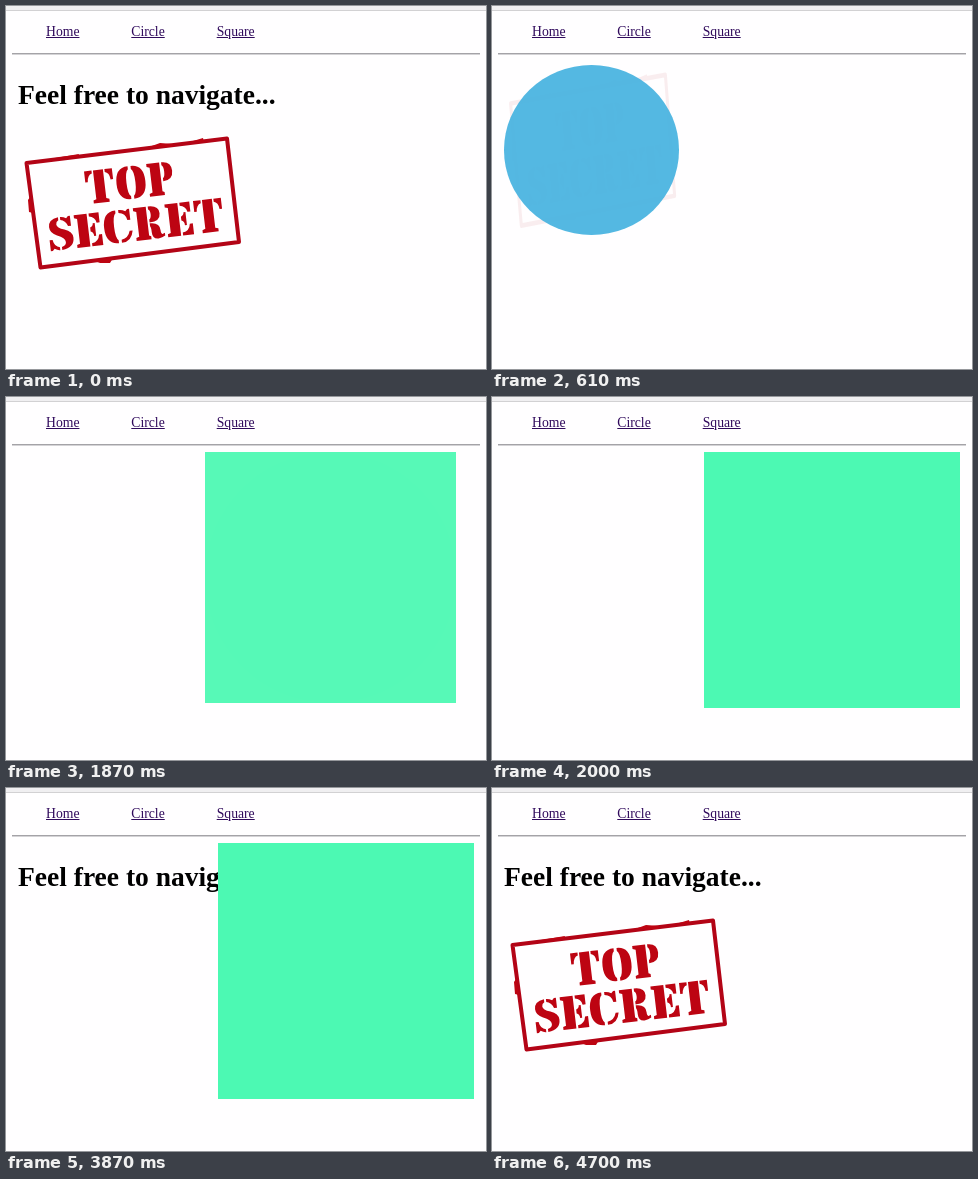
Animation of 480x363 px, one loop 4750 ms. Source, as an HTML page:

```html
<!DOCTYPE html>
<html lang="en">
<head>
<meta charset="utf-8">
<title>Shared element transitions</title>
<style>
  html, body { margin: 0; width: 100%; height: 100%; overflow: hidden; background: #fffeff; }
  body { position: relative; font-family: "Liberation Serif", Times, serif; }
  body > * { position: absolute; white-space: nowrap; }
  #chrome { left: 0; top: 0; width: 480px; height: 4px; background: #f0eff1; border-bottom: 1px solid #d2d1d3; }
  nav { left: 40px; top: 17px; font-size: 13.7px; line-height: 17px; }
  nav span { position: absolute; color: #300a5c; text-decoration: underline; }
  #rule { left: 6px; top: 47px; width: 468px; height: 1px; background: #a4a3a7; border-bottom: 1px solid #d4d3d6; }
  h1 { left: 12px; top: 73px; margin: 0; font-size: 27.5px; line-height: 32px; color: #000; }
  #morph > * { position: absolute; width: 100%; height: 100%; }
  #circle { background: #49b4e0; border-radius: 50%; }
  #square { background: #4cf9b3; }
</style>
</head>
<body>
<div id="chrome"></div>
<nav>
  <span>Home</span>
  <span style="left:85.3px">Circle</span>
  <span style="left:170.7px">Square</span>
</nav>
<div id="rule"></div>
<h1 id="title">Feel free to navigate...</h1>
<div id="morph">
  <svg id="stamp" viewBox="12 124 226 145" preserveAspectRatio="none" fill="#bd0412">
    <path d="M20.500 157L221 132.500L233 236L34.500 261.500Z" fill="none" stroke="#b30416" stroke-width="4" stroke-linejoin="round"/>
    <path d="M49 152L73 148L72 151ZM143 141L154 137L167 138L166 141ZM187 135L197 132L198 136ZM24 191L22 194L23 206L27 207ZM86 254L107 252L104 257L94 257Z"/>
    <g id="top" transform="translate(78 165.500) rotate(-6.8)"></g>
    <g id="secret" transform="translate(41 212.500) rotate(-6.8)"></g>
  </svg>
  <div id="circle"></div>
  <div id="square"></div>
</div>
<script>
const $ = id => document.getElementById(id);

// Stencil letters, 33 units tall: [width, path]
const leftBowl = 'M13 0Q0 0 0 16.5T13 33V30Q10 28 10 16.5T13 3Z';
const stem = 'M0 0H13V29L15 30V33H0V30L3 29V4L0 3Z';
const glyphs = {
  T: [28, 'M9 0H19V29L22 30V33H6V30L9 29ZM0 0H7.5V3Q3 4 2.5 11H0ZM28 0H20.500V3Q25 4 25.500 11H28Z'],
  O: [29, leftBowl + 'M16 0Q29 0 29 16.5T16 33V30Q19 28 19 16.5T16 3Z'],
  P: [25, stem + 'M15 0Q25 0 25 9.5T15 19V16Q17 15 17 9.5T15 3Z'],
  S: [24, 'M11 0Q1 1 1 9Q1 15 8 18Q16 21 16 25.500Q16 29 11.5 30V33Q24 32 24 22Q24 16 16 13Q8.500 10.500 8.500 7Q8.500 4 11 3Z' +
    'M13 0Q16 0 19 2L21 0H23V10H20Q18 4 13 3ZM9.500 33Q7 33 4 31L2 33H0V22H3Q4 29 9.500 30Z'],
  E: [26, 'M0 0H13V33H0V30L3 29V4L0 3ZM15 0H25V10H22Q21 4 15 3ZM15 33H26V22H23Q22 29 15 30Z' +
    'M15 14Q18 13 18 10H20V23H18Q18 19 15 18Z'],
  C: [28, leftBowl + 'M16 0Q20 0 23 2L25 0H27V11H24Q23 4 16 3ZM16 30Q23 29 25 22H28Q26 33 16 33Z'],
  R: [29, stem + 'M15 0Q26 0 26 8T15 16V13Q17 12 17 8T15 3Z' +
    'M15 17Q25 17 25 25Q25 29 27 29L29 28V31Q26 33 22 33Q16 33 16 26Q16 21 15 20Z']
};

function letter(id, word) {
  let x = 0;
  $(id).innerHTML = [...word].map(ch => {
    const [width, d] = glyphs[ch];
    const path = `<path transform="translate(${x})" d="${d}"/>`;
    x += width + 2.8;
    return path;
  }).join('');
}
letter('top', 'TOP');
letter('secret', 'SECRET');

const LOOP = 4750, STEPS_PER_MS = 0.023, DURATION = 5;
const boxes = {           // x, y, width, height
  stamp: [12, 124, 226, 145],
  circle: [12, 55, 171, 171],
  square: [212, 55, 256, 256]
};
const visits = [          // page, step at which it opens
  ['stamp', -99], ['circle', 9], ['square', 38], ['stamp', 87]
];
const cubicOut = t => 1 - (1 - t) ** 3;

function render(now) {
  const step = Math.floor((now % LOOP - 81) * STEPS_PER_MS);
  const index = visits.findLastIndex(([, start]) => step >= start);
  const [page, start] = visits[index];
  const from = index ? visits[index - 1][0] : page;
  const p = cubicOut(Math.min(1, (step - start) / DURATION));

  const [x, y, w, h] = boxes[from].map((v, i) => v + (boxes[page][i] - v) * p);
  $('morph').style.cssText = `left:${x}px;top:${y}px;width:${w}px;height:${h}px`;
  for (const id in boxes) {
    $(id).style.opacity = id === page ? p : id === from ? 1 - p : 0;
    $(id).style.zIndex = id === page ? 1 : 0;
  }
  $('title').style.visibility = page === 'stamp' ? 'visible' : 'hidden';
}

function tick() {
  render(performance.now());
  requestAnimationFrame(tick);
}
tick();
</script>
</body>
</html>
```
